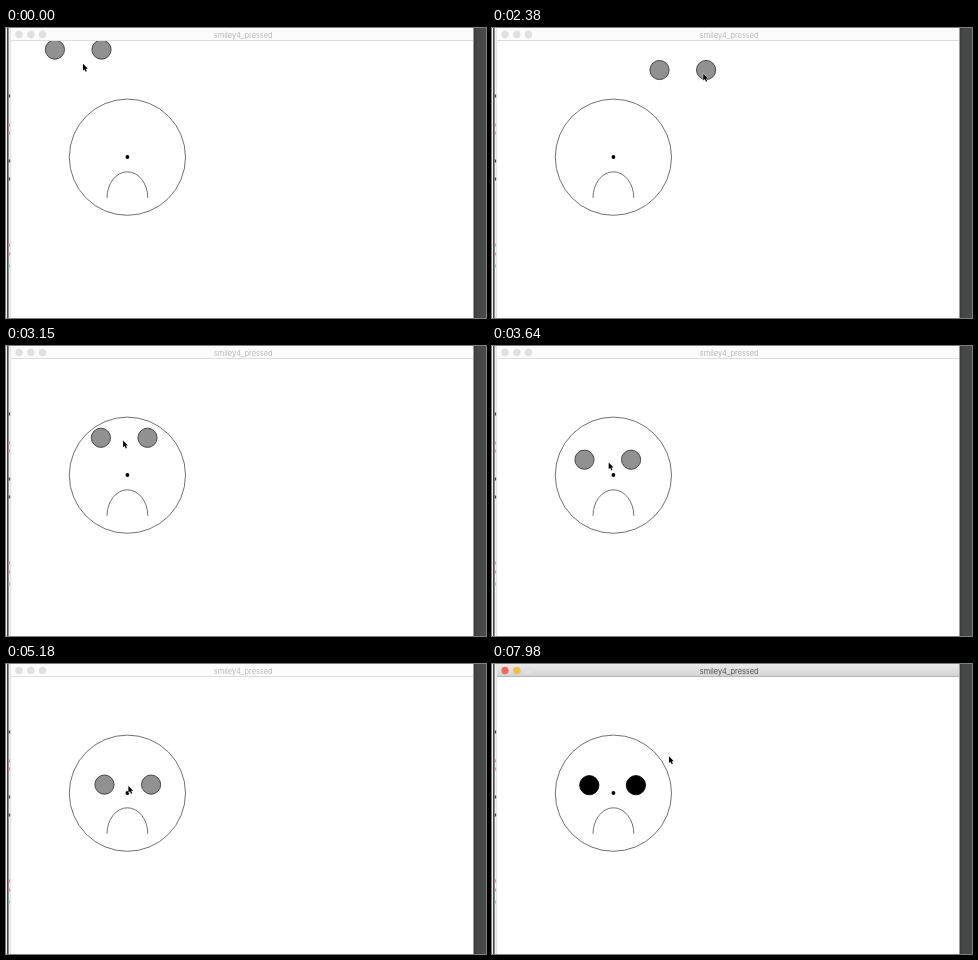
Recreate the animation shown at these times as an HTML page. Size 480 by 290 pixels, loop 8000 ms.

```html
<!DOCTYPE html>
<html lang="en">
<head>
<meta charset="utf-8">
<title>Smiley</title>
<style>
  html, body { margin: 0; width: 480px; height: 290px; overflow: hidden; background: #fff; }
  svg { display: block; }
  .line { fill: none; stroke: #585858; stroke-width: .85; }
  #bar { fill: #fcfcfc; }
  #rule { fill: #dedede; }
  #title { font: 7.4px Inter, "Liberation Sans", sans-serif; fill: #b8b8b8; text-anchor: middle; }
  .light { fill: #e0e0e0; }
  #eyes { fill: #919191; stroke: #3a3a3a; stroke-width: .9; }
  .active #bar { fill: url(#metal); }
  .active #rule { fill: #b5b5b5; }
  .active #title { fill: #505050; }
  .active .close { fill: #ee6a5f; }
  .active .mini { fill: #f0bd4f; }
  .active #eyes { fill: #000; stroke: #000; }
</style>
</head>
<body>
<svg id="stage" width="480" height="290" viewBox="0 0 480 290">
  <defs>
    <linearGradient id="metal" x2="0" y2="1">
      <stop stop-color="#eaeaea"/><stop offset="1" stop-color="#d4d4d4"/>
    </linearGradient>
    <linearGradient id="shade">
      <stop stop-color="#363737"/><stop offset=".3" stop-color="#454747"/><stop offset="1" stop-color="#494b4b"/>
    </linearGradient>
  </defs>

  <!-- desktop edges -->
  <rect width="480" height="290" fill="#f4f4f4"/>
  <rect x="1" width="1.6" height="290" fill="#484848"/>
  <rect x="467" width="13" height="290" fill="url(#shade)"/>
  <g id="marks"></g>

  <!-- window -->
  <rect x="4.5" width="463" height="290" fill="#fff"/>
  <rect x="4.5" width=".6" height="290" fill="#d0d0d0"/>

  <!-- face -->
  <circle class="line" cx="121.4" cy="129.2" r="58.1"/>
  <path class="line" d="M101 169.8A20.4 26 0 0 1 141.8 169.8"/>
  <g id="eyes"><circle cx="-23.3" r="9.6"/><circle cx="23.3" r="9.6"/></g>
  <circle cx="121.4" cy="129" r="1.9"/>

  <!-- title bar -->
  <rect id="bar" x="5" width="462" height="12"/>
  <rect id="rule" x="5" y="12" width="462" height="1"/>
  <circle class="light close" cx="13" cy="6.5" r="3.7"/>
  <circle class="light mini" cx="24.8" cy="6.5" r="3.7"/>
  <circle class="light" cx="36.5" cy="6.5" r="3.7"/>
  <text id="title" x="237.2" y="9.6">smiley4_pressed</text>

  <g id="cursor">
    <circle id="ring" r="13" cx="-.5" cy="-1" fill="none" stroke="#555" stroke-width="1.4"/>
    <path d="M0 0V8.2L1.9 6.5L3.2 9.6L4.6 9L3.3 6H5.7Z" transform="scale(.84)"
      stroke="#fff" stroke-width=".9" paint-order="stroke"/>
  </g>
</svg>
<script>
const LOOP = 8000, STEP = 70, LEAD = 42;
const WAKE = 1540, CLICK = 6790, RELEASE = 7000, LEAVE = 7630;

// Turning points of the spot midway between the eyes: ms, x, y
const path = [
  [1480, 72.2, 21.6], [1610, 77, 40], [1820, 76.5, 58],
  [2210, 76.5, 58], [2380, 190.8, 42], [2590, 264.5, 80], [2730, 244, 110],
  [3010, 138, 83], [3150, 118.2, 91.8], [3360, 113.5, 99], [3780, 117.3, 117.3],
  [4270, 121.5, 117.5], [4800, 118.5, 119], [5250, 122, 120.7],
  [6230, 122, 120.7], [6440, 120.6, 121.2]
];

const find = id => document.getElementById(id);
const clamp = (v, lo, hi) => Math.min(hi, Math.max(lo, v));

function slope(i, axis) {
  if (!path[i - 1] || !path[i + 1]) return 0;
  const rate = j => (path[j + 1][axis] - path[j][axis]) / (path[j + 1][0] - path[j][0]);
  const a = rate(i - 1), b = rate(i);
  return a * b > 0 ? 2 * a * b / (a + b) : 0;
}

// Smooth curve through the turning points, without overshoot
function eyes(time) {
  const t = clamp(time, path[0][0], path[path.length - 1][0]);
  const i = Math.max(1, path.findIndex(p => p[0] >= t));
  const [a, b] = [path[i - 1], path[i]];
  const span = b[0] - a[0], k = (t - a[0]) / span;
  const mix = k * k * (3 - 2 * k);
  return [1, 2].map(n => a[n] + (b[n] - a[n]) * mix
    + span * k * (1 - k) * ((1 - k) * slope(i - 1, n) - k * slope(i, n)));
}

// The pointer runs a little ahead of the eyes, then leaves in an arc.
function pointer(t) {
  if (t < WAKE) return [77, 35.8];
  if (t > LEAVE) {
    const k = (t - LEAVE) / (7980 - LEAVE);
    return [121 + 56 * k, 122.2 - 34 * Math.sin(2.06 * k)];
  }
  const [x, y] = eyes(t + LEAD);
  return [x + .4, y + 1];
}

function place(id, [x, y]) {
  find(id).setAttribute("transform", `translate(${x} ${y})`);
}

function draw() {
  const t = Math.floor(performance.now() % LOOP / STEP) * STEP;
  place("eyes", eyes(t));
  place("cursor", pointer(t));
  find("stage").classList.toggle("active", t >= CLICK);
  find("ring").style.display = t >= CLICK && t < RELEASE ? "" : "none";
  requestAnimationFrame(draw);
}

// slivers of text behind the window
const marks = { "#444": [68, 133, 151], "#d99": [97, 105, 217, 226], "#9cc": [238] };
for (const [fill, rows] of Object.entries(marks))
  for (const y of rows)
    find("marks").innerHTML += `<rect x="2.8" y="${y - 1.5}" width="1.6" height="3" fill="${fill}"/>`;

draw();
</script>
</body>
</html>
```
